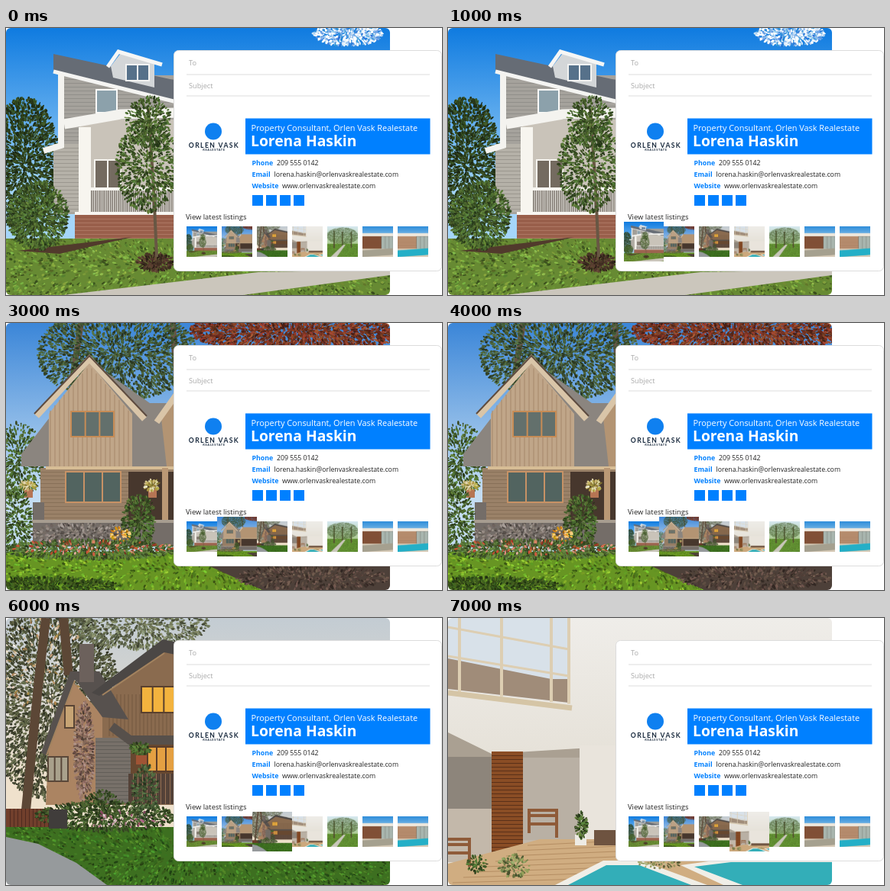
An HTML page with a canvas for the animation above (8 s loop, 570 by 350 pixels).

```html
<!DOCTYPE html>
<html lang="en">
<head>
<meta charset="utf-8">
<title>Listing email</title>
<style>
html, body { margin: 0; width: 570px; height: 350px; overflow: hidden; background: #fff; }
canvas, svg { position: absolute; left: 0; top: 0; }
#photo { border-radius: 6px; }
text { font: 8.75px "Open Sans", sans-serif; fill: #222; }
.hint { font-size: 9.2px; fill: #aaa; }
.label { font-weight: 700; fill: #0080ff; }
.role { font-size: 10.9px; fill: #fff; }
.name { font-size: 19.3px; font-weight: 700; fill: #fff; }
.heading { font-size: 9.4px; }
.logo { font: 700 8.6px Lato, sans-serif; letter-spacing: 1.4px; fill: #17283c; text-anchor: middle; }
.small { font-size: 4px; letter-spacing: .6px; }
</style>
</head>
<body>
<canvas id="photo" width="502" height="350"></canvas>
<svg width="570" height="350">
  <rect x="219.5" y="29.5" width="350" height="289" rx="6" fill="#fff" stroke="#dcdcdc"/>
  <text class="hint" x="239" y="49">To</text>
  <text class="hint" x="239" y="78.5">Subject</text>
  <path d="M236 61H554M236 89H554" stroke="#dedede" stroke-width="1.2"/>
  <circle cx="271" cy="135.5" r="11" fill="#0f80f0"/>
  <text class="logo" x="272" y="156.5">ORLEN VASK</text>
  <text class="logo small" x="272" y="160.5">REALESTATE</text>
  <rect x="313" y="118.5" width="241.5" height="47" fill="#0080ff"/>
  <text class="role" x="320.5" y="134.5">Property Consultant, Orlen Vask Realestate</text>
  <text class="name" x="320" y="155">Lorena Haskin</text>
  <text class="label" x="321.5" y="180">Phone</text><text x="354" y="180">209 555 0142</text>
  <text class="label" x="321.5" y="195">Email</text><text x="350.5" y="195">lorena.haskin@orlenvaskrealestate.com</text>
  <text class="label" x="321.5" y="209.5">Website</text><text x="361" y="209.5">www.orlenvaskrealestate.com</text>
  <path d="M322 226H390" stroke="#0080ff" stroke-width="14" stroke-dasharray="14 4"/>
  <text class="heading" x="235" y="250.5">View latest listings</text>
</svg>
<canvas id="thumbs" width="570" height="350"></canvas>
<script>
const W = 502, H = 350;
let g, seed;

const random = () => (seed = (seed * 16807) % 2147483647) / 2147483647;

function block(color, x, y, w, h) {
  g.fillStyle = color;
  g.fillRect(x, y, w, h);
}

function shape(color, points) {
  g.fillStyle = color;
  g.fill(new Path2D("M" + points));
}

function line(color, width, points) {
  g.strokeStyle = color;
  g.lineWidth = width;
  g.stroke(new Path2D("M" + points));
}

function sky(top, bottom) {
  const gradient = g.createLinearGradient(0, 0, 0, 220);
  gradient.addColorStop(0, top);
  gradient.addColorStop(1, bottom);
  block(gradient, 0, 0, W, H);
}

// Fills an ellipse with small flecks around one colour
function flecks([hue, saturation, lightness], x, y, rx, ry, density = 0.4) {
  for (let n = rx * ry * density; n > 0; n--) {
    const angle = random() * 2 * Math.PI, reach = Math.sqrt(random());
    const tone = lightness * (0.55 + 0.9 * random());
    g.fillStyle = `hsl(${hue + random() * 16 - 8} ${saturation}% ${tone}%)`;
    g.beginPath();
    g.ellipse(x + rx * reach * Math.cos(angle), y + ry * reach * Math.sin(angle),
      1 + 2 * random(), 0.7 + random(), angle, 0, 7);
    g.fill();
  }
}

function lawn(color, y) {
  block(`hsl(${color[0]} ${color[1]}% ${color[2]}%)`, 0, y, W, H - y);
  g.save();
  g.beginPath();
  g.rect(0, y, W, H);
  g.clip();
  flecks(color, W / 2, (y + H) / 2, W * 0.6, H - y, 0.2);
  g.restore();
}

// A wall with boards: lying by default, standing when upright
function boards(wall, seam, x, y, w, h, step = 5, upright = false) {
  block(wall, x, y, w, h);
  for (let d = step; d < (upright ? w : h); d += step)
    upright ? block(seam, x + d, y, 1, h) : block(seam, x, y + d, w, 1);
}

function panes(frame, glass, x, y, w, h, count) {
  block(frame, x, y, w, h);
  const pane = (w - 2) / count;
  for (let i = 0; i < count; i++) block(glass, x + 2 + i * pane, y + 2, pane - 2, h - 4);
}

const SHADE = [92, 38, 18], LEAF = [90, 38, 27], STONE = [25, 8, 44];

function greyHouse() {
  sky("#0f7be0", "#a5d6fa");
  flecks([210, 70, 85], 447, 8, 45, 15, 1);
  flecks(SHADE, 25, 180, 45, 90, 0.6);
  boards("#a5a29c", "#918f8a", 68, 62, 282, 90);
  shape("#666c75", "62,34 219,68 350,98V128L62,58");
  line("#f4f4f2", 5, "62,57 219,96 350,128");
  shape("#d3d6d8", "137,50 150,33 194,47V78L140,65");
  line("#f6f6f5", 5, "133,51 147,31 204,48");
  panes("#f3f3f2", "#56718a", 156, 47, 32, 23, 2);
  panes("#fafaf8", "#8ca1ab", 117, 80, 29, 32, 1);
  boards("#b5b1a8", "#9b978f", 62, 152, 34, 92);
  block("#c9c3b9", 96, 120, 254, 124);
  panes("#f5f3ee", "#746b60", 115, 172, 36, 45, 2);
  line("#f4f3ef", 13, "76,126 150,113 350,108");
  line("#f4f3ef", 8, "72,60V154L49,161");
  boards("#7a736b", "#f4f2ec", 110, 212, 240, 30, 2.5, true);
  line("#f8f6f1", 4, "110,211H350M90,243H350");
  block("#f7f5ef", 95, 130, 16, 112);
  boards("#995f4b", "#ad7763", 90, 245, 260, 32);
  lawn([84, 46, 37], 276);
  shape("#513a2c", "15,292 165,274 70,296");
  flecks([24, 30, 22], 195, 307, 24, 12, 1);
  shape("#cbc6bc", "75,350 330,320 502,317V324L310,350");
  flecks(LEAF, 42, 246, 40, 45, 0.7);
  line("#685744", 4, "197,300 193,210 186,105");
  flecks(LEAF, 184, 180, 40, 62);
  flecks(LEAF, 186, 123, 30, 34);
}

function gableHouse() {
  sky("#3b86d8", "#c3dcf2");
  line("#655447", 8, "86,80 98,0M225,100 218,0");
  flecks([95, 25, 26], 145, 40, 105, 62, 0.45);
  flecks([14, 55, 30], 380, 10, 140, 30, 0.8);
  flecks(LEAF, 15, 180, 35, 50);
  shape("#8b857f", "20,172 60,120 110,50 188,105H350V188H20");
  shape("#c0a689", "109,52 165,119V192H56V119");
  for (let x = 58; x < 165; x += 6) line("#a98d70", 1.2, `${x},192V${56 + Math.abs(x - 109) * 1.15}`);
  shape("#b39473", "219,92H350V188H210L203,125");
  line("#d9c5a8", 8, "40,122 109,47 181,126M197,130 224,92");
  line("#5e4c40", 2, "37,119 109,43 184,122");
  boards("#9a8168", "#877058", 45, 190, 305, 72);
  line("#d7bd95", 4, "52,190H350");
  panes("#c68c56", "#63706c", 84, 115, 58, 35, 3);
  panes("#c79265", "#526460", 77, 194, 74, 42, 3);
  block("#47372d", 160, 195, 190, 70);
  block("#ba9875", 204, 190, 8, 80);
  block("#746d68", 35, 235, 15, 56);
  block("#746d68", 35, 260, 315, 33);
  flecks(STONE, 100, 276, 66, 15);
  line("#a79d90", 4, "34,260H154M188,260H350");
  for (const x of [29, 191]) {
    block("#b67554", x - 5, 218, 11, 11);
    flecks([50, 45, 60], x, 213, 10, 7, 1);
  }
  flecks(LEAF, 14, 260, 20, 46);
  flecks(LEAF, 174, 258, 22, 34, 0.6);
  lawn([84, 62, 36], 300);
  flecks([88, 35, 30], 110, 297, 118, 13, 0.7);
  flecks([14, 60, 55], 110, 294, 110, 10, 0.1);
  flecks([40, 85, 55], 150, 277, 13, 9);
  flecks([90, 50, 20], 50, 345, 100, 12, 0.7);
  shape("#4d4039", "260,316H502V350H335");
  flecks([20, 18, 28], 400, 334, 100, 16);
}

function duskHouse() {
  sky("#c3ccd3", "#efe1cc");
  flecks([70, 18, 27], 60, 110, 90, 130, 0.45);
  flecks([75, 15, 38], 175, 8, 90, 34);
  flecks([35, 40, 65], 50, 60, 60, 60, 0.05);
  line("#5c4736", 12, "25,262 42,90 52,0M82,75 75,0");
  shape("#8a6b4f", "205,38 350,75V245H100L122,105");
  for (let x = 135; x < 350; x += 5) line("#735940", 1, `${x},155V100`);
  shape("#ab8462", "88,84 126,128V245H52L56,165");
  shape("#57514e", "84,70H122L160,133 126,130 90,80 53,181 46,176");
  shape("#4b4745", "112,98 205,28 350,60V75L207,45 122,102");
  line("#a3835f", 2, "90,82 53,180M207,46 126,101");
  block("#6c615c", 96, 34, 19, 50);
  flecks([18, 20, 43], 102, 175, 13, 66, 0.8);
  panes("#59402e", "#f3b33e", 176, 89, 46, 36, 3);
  panes("#584435", "#c7a474", 76, 114, 14, 31, 1);
  panes("#594739", "#a9a18c", 54, 181, 28, 34, 3);
  boards("#777069", "#625e58", 117, 157, 48, 86);
  line("#57504b", 12, "138,142 162,160H350");
  block("#674830", 163, 166, 187, 77);
  panes("#5b3d2a", "#e4a042", 184, 168, 38, 34, 3);
  boards("#544238", "#957053", 160, 204, 190, 40, 6, true);
  flecks(LEAF, 176, 171, 14, 8, 1);
  block("#a05435", 170, 180, 14, 12);
  boards("#713f2c", "#4e2a20", 0, 250, 60, 27, 5, true);
  lawn([98, 55, 28], 274);
  flecks([90, 35, 23], 130, 260, 92, 20, 0.6);
  flecks([90, 35, 23], 125, 248, 24, 23);
  flecks([95, 25, 27], 182, 230, 18, 38);
  flecks([340, 30, 60], 155, 264, 60, 13, 0.06);
  block("#403d3b", 56, 251, 24, 25);
  shape("#969a9c", "0,287 42,296 92,321 132,350H0");
}

function whiteHouse() {
  sky("#efede9", "#e4dfd5");
  shape("#d8e1e9", "0,0H158V111L0,93");
  shape("#a08c79", "0,53 135,80H158V111L0,93");
  for (const x of [15, 70, 135, 158]) line("#ddceb2", 4, `${x},0V${95 + x / 9}`);
  line("#ddceb2", 3, "0,12 158,41M0,50 158,76");
  line("#d5c5a6", 7, "0,98 162,118");
  shape("#aaa092", "0,150 57,178 219,168V295H0");
  block("#8d857b", 0, 182, 58, 70);
  shape("#c3b8aa", "0,250H170V320H0");
  block("#b9b0a4", 98, 183, 75, 108);
  boards("#8a4d25", "#5a3019", 57, 175, 41, 144);
  block("#e9e4dc", 172, 167, 178, 130);
  shape("#d0ad81", "0,322 120,290H350L502,318V350H0");
  for (let y = 298; y < H; y += 7) line("#b58e63", 1, `${(H - y) * 2},${y} 245,${y - 7}`);
  for (const [x, y] of [[104, 252], [-10, 290]]) {
    line("#8f5b39", 4, `${x},${y}h40m-40,7h40m-40,11h40m-38,-18v30m36,-30v36`);
  }
  block("#6e5340", 191, 278, 159, 20);
  block("#eeebe4", 166, 284, 15, 14);
  flecks(LEAF, 174, 272, 8, 18, 0.7);
  flecks(LEAF, 38, 322, 13, 12);
  flecks([75, 28, 40], 87, 325, 21, 15);
  shape("#f0eee7", "140,350 203,318H252L339,350M304,324 363,316H502V350H360");
  shape("#33aeb8", "157,350 207,324H250L318,350M322,326 370,320H502V350H385");
  flecks([60, 25, 45], 277, 321, 28, 7);
}

function park() {
  sky("#d7e9f2", "#a9c98a");
  lawn([90, 48, 38], 200);
  line("#51432f", 12, "80,250V50M175,220V60M275,245V60");
  flecks(LEAF, 175, 110, 180, 95, 0.3);
  shape("#c9c7bb", "185,210H210L110,350H40");
}

function modernHouse(wall, ground) {
  sky("#2f8edb", "#c8e4f2");
  boards(wall, "#6b432f", 0, 115, 230, 180, 18);
  block("#efe8dc", 0, 80, 350, 35);
  panes("#463a33", "#a8b5ae", 215, 115, 135, 160, 3);
  block("#d8cbb8", 0, 255, 350, 95);
  shape(ground, "0,275 350,250V325L0,350");
}

const scenes = [
  greyHouse, gableHouse, duskHouse, whiteHouse, park,
  () => modernHouse("#825137", "#a5a08f"),
  () => modernHouse("#b98f70", "#24afc7"),
].map((draw, i) => {
  const canvas = document.createElement("canvas");
  canvas.width = W;
  canvas.height = H;
  g = canvas.getContext("2d");
  seed = 971 + i * 131;
  draw();
  return canvas;
});

const photo = document.getElementById("photo").getContext("2d");
const thumbs = document.getElementById("thumbs").getContext("2d");
thumbs.imageSmoothingQuality = "high";

function drawThumb(i, grow) {
  const size = 40 + 2 * grow;
  thumbs.drawImage(scenes[i], 0, 0, H, H, 236 + 46 * i - grow, 260 - grow, size, size);
}

// The first second has no raised thumbnail; then each listing gets two seconds
function frame() {
  const second = Math.floor(performance.now() / 1000) % 8;
  const active = Math.floor((second - 1) / 2);
  photo.drawImage(scenes[Math.max(0, active)], 0, 0);
  thumbs.clearRect(0, 0, 570, 350);
  scenes.forEach((_, i) => drawThumb(i, 0));
  if (active >= 0) drawThumb(active, 6);
  requestAnimationFrame(frame);
}
frame();
</script>
</body>
</html>
```
